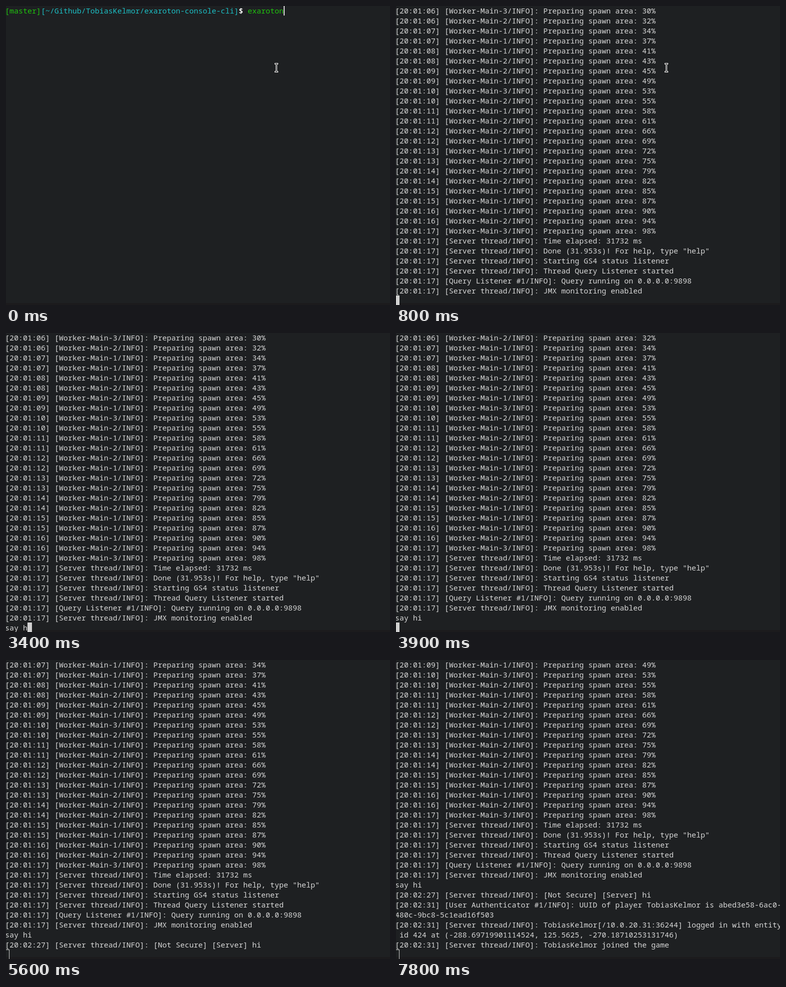
Recreate the animation shown at these times as an HTML page. Size 769 px wide and 598 px high, loop 8000 ms.

```html
<!DOCTYPE html>
<html lang="en">
<head>
<meta charset="utf-8">
<title>Server console</title>
<style>
  html, body { margin: 0; width: 100%; height: 100%; overflow: hidden; background: #1e2022; }
  #stage { position: relative; width: 769px; height: 598px; overflow: hidden; background: #1e2022; }
  #edge { position: absolute; left: 0; top: 594px; width: 100%; height: 4px; background: #1c1b1d; }
  #text {
    position: absolute; left: -2px; top: -1px; margin: 0;
    font: 15px/20px "Noto Sans Mono", monospace;
    color: #d8d8d8; white-space: pre; font-variant-ligatures: none;
  }
  #text b { color: #fff; line-height: 1; }
  .branch { color: #20c30e; }
  .path { color: #1cbec4; }
  #caret { position: absolute; box-sizing: border-box; width: 9px; height: 20px; }
  #caret.block { background: #d0d0d0; }
  #caret.bar { width: 2px; background: #d8d8d8; }
  #caret.hollow { border: 1px solid #d0d0d0; }
  #caret.off { display: none; }
  #mouse { position: absolute; width: 7px; height: 19px; shape-rendering: crispEdges; }
</style>
</head>
<body>
<div id="stage">
  <div id="edge"></div>
  <div id="caret"></div>
  <pre id="text"></pre>
  <svg id="mouse" viewBox="0 0 7 19">
    <path fill="#fff" d="M0 0h7v3h-2v13h2v3h-7v-3h2v-13h-2z"/>
    <path fill="#000" d="M1 1h5v1h-2v15h2v1h-5v-1h2v-15h-2z"/>
  </svg>
</div>
<script>
const $ = id => document.getElementById(id);
const CELL = 9, ROW = 20, ROWS = 29, LOOP = 8000;
const player = 'TobiasKelmor';

const prompt = '<span class="branch">[master]</span>' +
  `<span class="path">[~/Github/${player}/exaroton-console-cli]</span>` +
  '<b>$</b> <span class="branch">exaroton</span>';

const entry = (time, thread, msg) => `[20:${time}] [${thread}/INFO]: ${msg}`;
const server = (time, msg) => entry(time, 'Server thread', msg);

// Worker number and progress; two entries per second from 20:01:06
const workers = '32111221321221122211123';
const progress = [30, 32, 34, 37, 41, 43, 45, 49, 53, 55, 58, 61,
  66, 69, 72, 75, 79, 82, 85, 87, 90, 94, 98];

const log = [
  ...progress.map((p, i) => entry(
    '01:' + String(6 + (i >> 1)).padStart(2, '0'),
    'Worker-Main-' + workers[i],
    `Preparing spawn area: ${p}%`)),
  server('01:17', 'Time elapsed: 31732 ms'),
  server('01:17', 'Done (31.953s)! For help, type "help"'),
  server('01:17', 'Starting GS4 status listener'),
  server('01:17', 'Thread Query Listener started'),
  entry('01:17', 'Query Listener #1', 'Query running on 0.0.0.0:9898'),
  server('01:17', 'JMX monitoring enabled'),
  'say hi',
  server('02:27', '[Not Secure] [Server] hi'),
  entry('02:31', 'User Authenticator #1', `UUID of player ${player} is abed3e58-6ac0-`),
  '480c-9bc8-5c1ead16f503',
  server('02:31', `${player}[/10.0.20.31:36244] logged in with entity`),
  ' id 424 at (-288.69719901114524, 125.5625, -270.18710253131746)',
  server('02:31', `${player} joined the game`)
];

const home = [538, 114], away = [667, 96];

// time, log lines printed (0 = shell), typed input, caret, mouse position
const steps = [
  [0, 0, '', 'bar', home],
  [300, 0, '', 'off', home],
  [500, 0, '', 'block', home],
  [800, 29, '', 'block', home],
  [1100, 29, '', 'off', home],
  [1600, 29, '', 'block', home],
  [2100, 29, '', 'off', home],
  [2300, 29, 's', 'block', home],
  [2500, 29, 'sa', 'block', home],
  [2700, 29, 'say', 'block', home],
  [2900, 29, 'say ', 'block', null],
  [3400, 29, 'say h', 'block', null],
  [3700, 29, 'say hi', 'block', null],
  [3900, 30, '', 'block', null],
  [4000, 31, '', 'block', null],
  [4500, 31, '', 'block', away],
  [4600, 31, '', 'block', null],
  [5100, 31, '', 'off', null],
  [5600, 31, '', 'hollow', null],
  [7700, 33, '', 'hollow', null],
  [7800, 36, '', 'hollow', null]
];

function place(el, x, y) {
  el.style.left = x + 'px';
  el.style.top = y + 'px';
}

function show([, printed, input, caret, mouse]) {
  if (printed) $('text').textContent = [...log.slice(printed - ROWS, printed), input].join('\n');
  else $('text').innerHTML = prompt;

  const col = caret === 'bar' ? $('text').textContent.length : input.length;
  const row = printed ? ROWS : caret === 'bar' ? 0 : 1;
  $('caret').className = caret;
  place($('caret'), col * CELL - 2, row * ROW - 1);

  $('mouse').style.display = mouse ? '' : 'none';
  if (mouse) place($('mouse'), ...mouse);
}

let shown;
function tick() {
  const t = performance.now() % LOOP;
  const step = steps.findLast(s => s[0] <= t);
  if (step !== shown) show(shown = step);
  requestAnimationFrame(tick);
}
tick();
</script>
</body>
</html>
```
